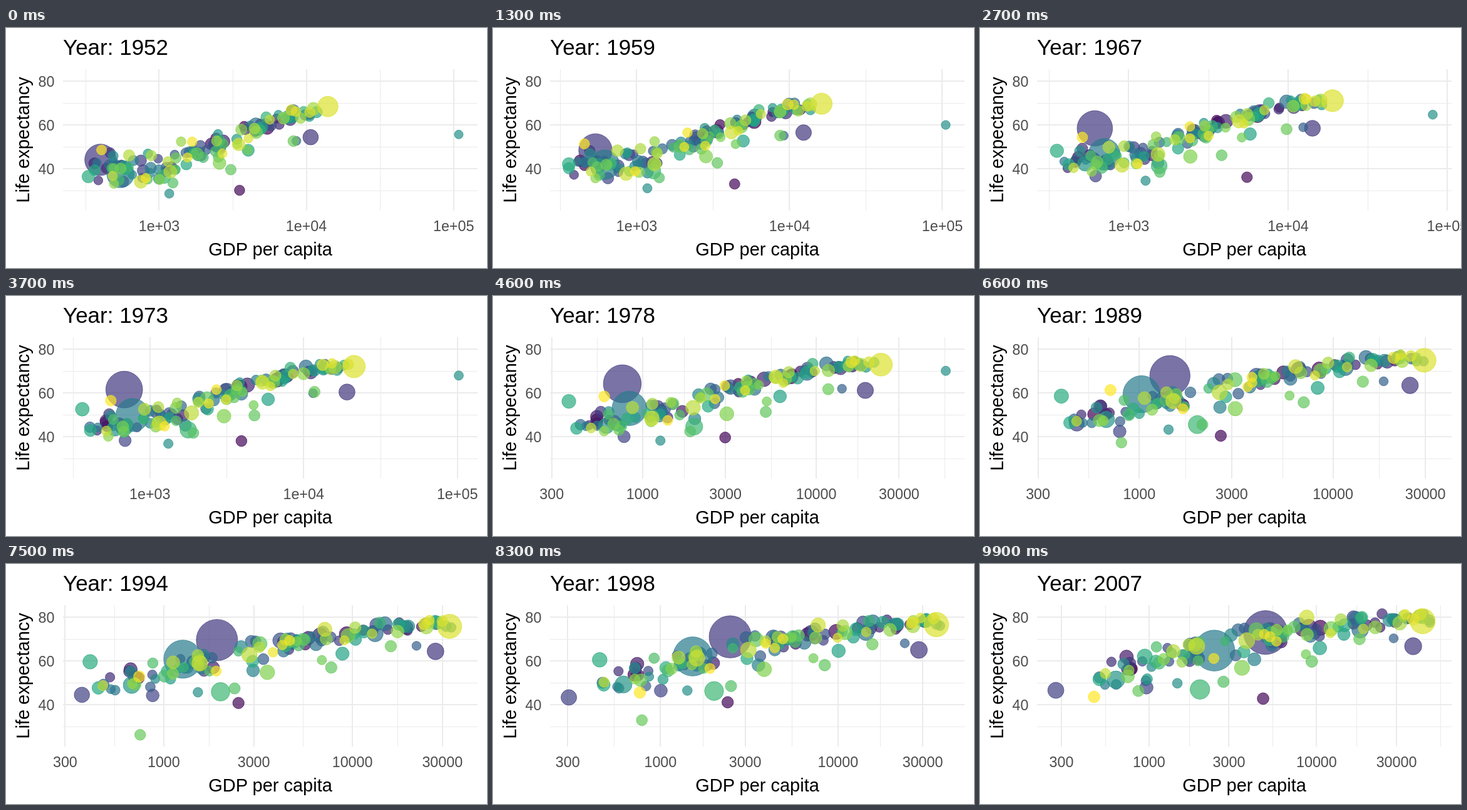
An HTML page that plays this animation: 768x384 px, repeating every 10 s.

```html
<!DOCTYPE html>
<html lang="en">
<head>
<meta charset="utf-8">
<title>Life expectancy and GDP</title>
<style>
  html, body { margin: 0; width: 100%; height: 100%; overflow: hidden; background: #fff; }
  svg { display: block; width: 768px; height: 384px; font-family: "Liberation Sans", Arial, sans-serif; }
  .tick { font-size: 23.3px; fill: #4d4d4d; }
  .name { font-size: 29px; text-anchor: middle; }
  .major { stroke: #ebebeb; stroke-width: 2; }
  .minor { stroke: #ebebeb; stroke-width: 1; }
  circle { fill-opacity: .7; stroke-opacity: .7; stroke-width: 1; }
</style>
</head>
<body>
<svg viewBox="0 0 768 384">
  <g id="rows"></g>
  <g id="columns"></g>
  <g id="bubbles"></g>
  <g id="labels"></g>
  <text id="title" x="91" y="43" font-size="35"></text>
  <text class="name" x="422" y="364">GDP per capita</text>
  <text class="name" transform="translate(37 179) rotate(-90)">Life expectancy</text>
</svg>
<script>
const LOOP = 10000, FRAME = 100, FIRST = 1952, LAST = 2007, COUNTRIES = 142;
const PANEL = { left: 91, right: 753, top: 66, bottom: 292 };
const byId = id => document.getElementById(id);
const mix = (a, b, t) => a + (b - a) * t;
const clamp = (v, lo, hi) => Math.max(lo, Math.min(hi, v));

function add(parent, tag, attrs, text = "") {
  const node = document.createElementNS("http://www.w3.org/2000/svg", tag);
  for (const key in attrs) node.setAttribute(key, attrs[key]);
  node.textContent = text;
  return parent.appendChild(node);
}

// Keys are [year, ...values]; returns the values between the two nearest keys.
function sample(keys, year) {
  let i = 1;
  while (i < keys.length - 1 && keys[i][0] < year) i++;
  const [a, b] = [keys[i - 1], keys[i]];
  const t = clamp((year - a[0]) / (b[0] - a[0]), 0, 1);
  return a.slice(1).map((v, j) => mix(v, b[j + 1], t));
}
const logGdp = ([year, gdp, ...rest]) => [year, Math.log10(gdp), ...rest];

let seed = 1952;
function random() {
  seed = (seed + 0x6d2b79f5) | 0;
  let t = Math.imul(seed ^ seed >>> 15, 1 | seed);
  t = t + Math.imul(t ^ t >>> 7, 61 | t) ^ t;
  return ((t ^ t >>> 14) >>> 0) / 4294967296;
}
const normal = () => (random() + random() + random() - 1.5) * 2;

// Lowest and highest income over time: the horizontal view follows them.
const poorest = [[1952, 299], [1959, 360], [1967, 349], [1977, 371], [1982, 424], [1992, 347],
  [1994.5, 379], [2002, 241], [2007, 278]].map(logGdp);
const richest = [[1952, 108382], [1957, 113523], [1967, 80895], [1972, 109348], [1977, 59265],
  [1982, 33693], [1987, 31541], [2007, 49357]].map(logGdp);

// Bubbles that leave the general trend; path points are year, income, life expectancy.
const standouts = [
  { rank: 24, people: 556, growth: 2.37, path: [[1952, 400, 44], [1959, 535, 48], [1967, 613, 58.4],
    [1977, 741, 64], [1998, 2450, 71], [2007, 4959, 73]] },
  { rank: 58, people: 372, growth: 2.98, path: [[1952, 547, 37.4], [1988, 1000, 59.2],
    [1998, 1510, 62], [2007, 2452, 64.7]] },
  { rank: 134, people: 157, growth: 1.9, path: [[1952, 13990, 68.4], [2007, 42952, 78.2]] },
  { rank: 71, people: .2, growth: 12, path: [[1952, 2e5, 55.6], [1972, 2e5, 67.7],
    [1987, 28100, 74.2], [2007, 47300, 77.6]] },
  { rank: 87, people: 20, growth: 2.4, path: [[1952, 331, 36.3], [1977, 371, 56],
    [1997, 415, 60.3], [2007, 944, 62]] },
  { rank: 141, people: 3, growth: 4, path: [[1952, 407, 48.5], [1988, 706, 62.4],
    [1998, 770, 45.5], [2007, 470, 43.5]] },
  { rank: 107, people: 2.5, growth: 3.5, path: [[1952, 493, 40], [1987, 848, 44],
    [1992, 737, 23.6], [2007, 863, 46.2]] },
  { rank: 3, people: 4.2, growth: 2.9, path: [[1952, 3521, 30], [1967, 5523, 36],
    [1977, 3009, 39.5], [1998, 2370, 41], [2007, 4797, 42.7]] },
  { rank: 94, people: 33, growth: 4.1, path: [[1952, 1077, 36.3], [1977, 1982, 44.5],
    [2007, 2014, 46.9]] },
  { rank: 27, people: 14, growth: 4.6, path: [[1952, 781, 39], [1982, 670, 47.8],
    [1998, 295, 43.2], [2007, 278, 46.5]] }
];

// Life expectancy rises with log income along a curve that lifts and flattens over time.
const usualLife = (gdp, t) => mix(36, 42, t) +
  mix(36, 39, t) / (1 + Math.exp(-mix(3.3, 2.2, t) * (gdp - mix(3.5, 3.2, t))));

function trendBubble(rank) {
  const place = random();
  const later = clamp(place + .08 * normal(), 0, 1);
  const [early, late] = [normal(), normal()];
  const behind = random() < .08 ? 11 : 0;
  const path = [];
  for (let year = FIRST; year <= LAST; year += 5) {
    const t = (year - FIRST) / (LAST - FIRST);
    const gdp = mix(2.55 + 1.5 * place, 2.7 + 1.93 * later, t) + .025 * normal();
    const spread = mix(4.5, 1.3, place);
    path.push([year, gdp, Math.min(82.6, usualLife(gdp, t) + spread * mix(early, late, t) - behind)]);
  }
  return { rank, people: 3.8 * Math.exp(1.15 * normal()), growth: mix(3.3, 1.5, place), path };
}

// Viridis colours, evenly spaced.
const viridis = [[68, 1, 84], [65, 68, 135], [42, 120, 142], [34, 168, 132], [122, 209, 81], [253, 231, 37]];
function colour(t) {
  const at = t * (viridis.length - 1), i = Math.min(Math.floor(at), viridis.length - 2);
  return `rgb(${viridis[i].map((c, j) => Math.round(mix(c, viridis[i + 1][j], at - i)))})`;
}

const bubbles = Array.from({ length: COUNTRIES }, (_, rank) => {
  const special = standouts.find(s => s.rank === rank);
  const bubble = special ? { ...special, path: special.path.map(logGdp) } : trendBubble(rank);
  const paint = colour(rank / (COUNTRIES - 1));
  bubble.node = add(byId("bubbles"), "circle", { fill: paint, stroke: paint });
  return bubble;
});

const yOf = life => 85.2 + (80 - life) * 3.49;
// Radius grows with the square root of the population.
const radius = people => (2 + 10 * Math.sqrt(people / 1318)) * 2.845 + .945;

for (let life = 30; life <= 80; life += 10) {
  const major = life % 20 === 0, y = Math.round(yOf(life)) + (major ? 0 : .5);
  add(byId("rows"), "line", { class: major ? "major" : "minor", x1: PANEL.left, x2: PANEL.right, y1: y, y2: y });
  if (major) add(byId("labels"), "text", { class: "tick", x: 77.5, y: y + 9, "text-anchor": "end" }, life);
}
const ticks = add(byId("labels"), "g", { class: "tick", "text-anchor": "middle" });

function drawColumns(xOf) {
  const columns = byId("columns");
  columns.replaceChildren();
  ticks.replaceChildren();
  const inside = x => x >= PANEL.left && x <= PANEL.right;
  const line = (kind, x) => inside(x) && add(columns, "line",
    { class: kind, x1: x, x2: x, y1: PANEL.top, y2: PANEL.bottom });
  const wide = inside(xOf(5));
  const breaks = wide ? [100, 1e3, 1e4, 1e5, 1e6] : [100, 300, 1e3, 3e3, 1e4, 3e4, 1e5];
  breaks.forEach((value, i) => {
    const x = xOf(Math.log10(value));
    if (i) line("minor", Math.round(xOf(Math.log10(value * breaks[i - 1]) / 2)) + .5);
    line("major", Math.round(x));
    if (inside(x)) add(ticks, "text", { x, y: 325 }, wide ? "1e+0" + Math.log10(value) : value);
  });
}

function draw(ms) {
  const t = Math.floor(ms % LOOP / FRAME) / (LOOP / FRAME - 1);
  const year = mix(FIRST, LAST, t);
  const [low] = sample(poorest, year), [high] = sample(richest, year);
  const xOf = gdp => 121.1 + 601.8 * (gdp - low) / (high - low);
  byId("title").textContent = "Year: " + Math.round(year);
  drawColumns(xOf);
  for (const { node, path, people, growth } of bubbles) {
    const [gdp, life] = sample(path, year);
    node.setAttribute("cx", xOf(clamp(gdp, low, high)).toFixed(2));
    node.setAttribute("cy", yOf(life).toFixed(2));
    node.setAttribute("r", radius(people * mix(1, growth, t)).toFixed(2));
  }
}

const start = performance.now();
function tick() {
  draw(performance.now() - start);
  requestAnimationFrame(tick);
}
tick();
</script>
</body>
</html>
```
